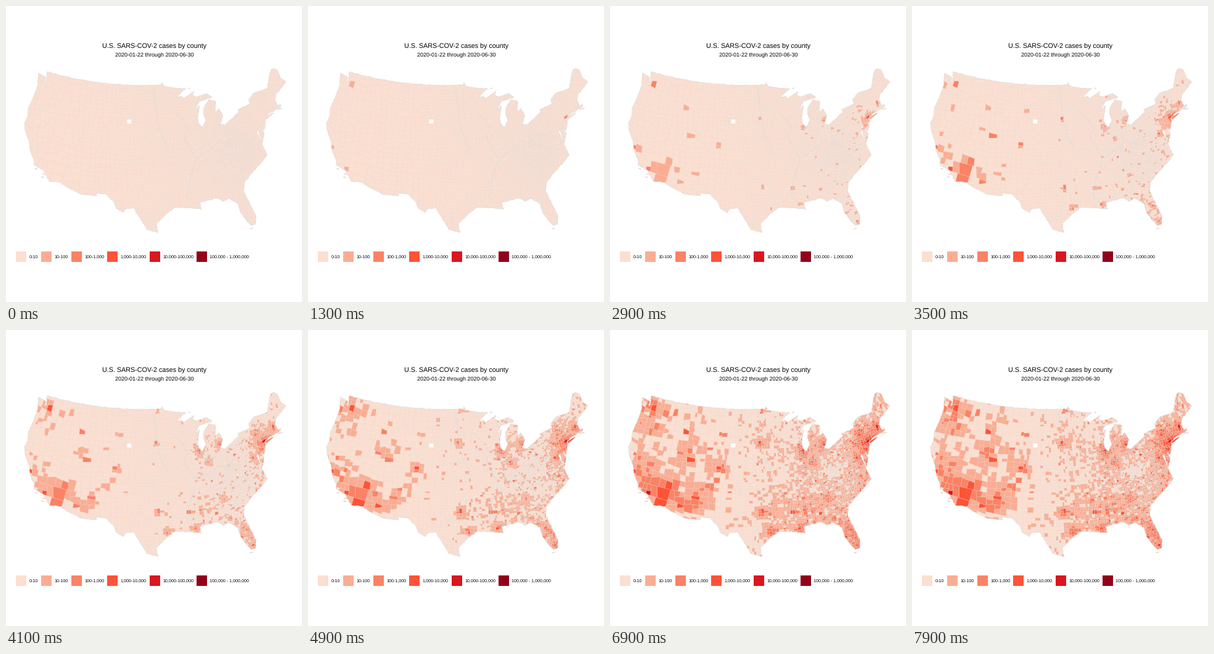
A matplotlib script for the animation above (8000 ms loop, 480 by 480 pixels).

```python
import numpy as np
import matplotlib.pyplot as plt
from matplotlib.animation import FuncAnimation
from matplotlib.collections import LineCollection, PolyCollection
from matplotlib.patches import PathPatch, Rectangle
from matplotlib.path import Path

plt.rcParams["text.hinting"] = "none"
PT = 0.72  # points per pixel at 100 dpi
STEPS = 38
SHADES = np.array(["#fbdfd1", "#faad93", "#fb8265", "#fe5338", "#da161e", "#92001a"])
LABELS = ["0-10", "10-100", "100-1,000", "1,000-10,000", "10,000-100,000",
          "100,000 - 1,000,000"]
SWATCH_X = [16, 57, 106, 164, 233, 309]
GREY = "#d8dcde"
rng = np.random.default_rng(11)

# Key points of the border as (longitude, latitude)
WEST_COAST = [
    (-124.7, 48.38), (-124, 46.6), (-124.1, 44.6), (-124.5, 42.8), (-124.1, 41.4),
    (-124.4, 40.4), (-123.8, 39.3), (-122.5, 37.8), (-121.9, 36.6), (-120.6, 35.1),
    (-120.5, 34.5), (-118.5, 34), (-118.3, 33.7), (-117.12, 32.53)]
SOUTH_BORDER = [
    (-114.72, 32.72), (-114.81, 32.5), (-111.07, 31.33), (-108.21, 31.33),
    (-108.21, 31.78), (-106.5, 31.78), (-105, 30.65), (-104.5, 29.65), (-103.2, 28.98),
    (-102.7, 29.7), (-101.4, 29.77), (-100.3, 28.3), (-99.1, 26.4), (-97.15, 25.88)]
GULF_COAST = [
    (-97.4, 27.3), (-95.1, 29.1), (-93.8, 29.7), (-91.3, 29.4), (-90.1, 29.15),
    (-89.4, 29), (-89.5, 30.1), (-87.2, 30.35), (-86.2, 30.4), (-85.3, 29.7),
    (-84.3, 30.05), (-82.8, 29), (-82.6, 27.5), (-81.7, 25.9), (-81.1, 25.15),
    (-80.4, 25.2)]
EAST_COAST = [
    (-80.05, 26.5), (-80.6, 28.2), (-81.4, 30.7), (-81, 31.9), (-79.4, 33.1),
    (-77.95, 33.9), (-76.5, 34.7), (-75.6, 35.25), (-76, 36.9), (-76.4, 39.2),
    (-76.1, 39.3), (-75.95, 37.2), (-75.05, 38.5), (-75.5, 39.55), (-74.9, 38.95),
    (-74, 40.4), (-74, 40.75), (-72.9, 41.25), (-70.7, 41.55), (-70, 41.65),
    (-70, 42.05), (-70.5, 41.8), (-70.8, 42.8), (-70.2, 43.6), (-67, 44.8)]
LAKES = [
    (-67.8, 45.7), (-67.8, 47.05), (-68.3, 47.35), (-69.2, 47.45), (-70, 46.7),
    (-71.5, 45), (-74.7, 45), (-76.2, 44.2), (-76.2, 43.55), (-79.05, 43.27),
    (-78.9, 42.85), (-82.5, 41.4), (-83.4, 41.7), (-82.45, 42.9), (-83, 44.07),
    (-83.9, 43.7), (-83.4, 45.3), (-84.75, 45.78), (-86.2, 44.7), (-86.5, 43.7),
    (-86.2, 42.7), (-87.2, 41.65), (-87.8, 42.3), (-87.9, 43.2), (-87.1, 45.1),
    (-88, 44.6), (-87, 45.75), (-84, 46), (-85, 46.75), (-87.4, 46.5), (-88.3, 46.9),
    (-87.8, 47.45), (-90.4, 46.55), (-90.9, 46.95), (-92.1, 46.75), (-90.3, 47.75),
    (-89.6, 48), (-92, 48.3), (-94.6, 48.75), (-95.15, 49.38)]
PARALLEL = [(lon, 49) for lon in np.linspace(-95.15, -122.76, 8)]
SOUND = [(-122.5, 48.2), (-122.35, 47.6), (-122.6, 47.3), (-122.7, 48.1)]
LONG_ISLAND = [(-73.98, 40.6), (-73.75, 40.87), (-72.3, 41.13), (-71.9, 41.06),
               (-73.6, 40.57)]
ISLETS = [(-120, 34), (-118.4, 33.4), (-118.45, 32.95), (-70.6, 41.38), (-70.1, 41.28),
          (-88.8, 48), (-81.2, 24.7)]
RIVERS = [
    [(-93.3, 45), (-91.2, 43.3), (-90.2, 41.8), (-91.2, 40.5), (-89.2, 37), (-91, 33.7),
     (-91.6, 31), (-90.2, 30)],
    [(-97.2, 49), (-96.5, 43.5), (-95.8, 41), (-94.6, 39.1)],
    [(-89.2, 37), (-85.7, 38.3), (-84.5, 39.1), (-82.5, 38.5), (-80.7, 40)]]

# Wide regions: longitude, latitude, log10 gain, radius in degrees
REGIONS = [
    (-120.5, 37, 1.6, 2.6), (-116.3, 34.5, 2.1, 2.2), (-111.3, 34.2, 1.6, 2.6),
    (-107.8, 35.5, 0.9, 1.8), (-121.5, 46.8, 1.2, 2.5), (-122.8, 43.5, 0.5, 1.8),
    (-112.5, 42, 0.6, 2.2), (-105.5, 39.8, 1.4, 1.4), (-74.5, 41, 1.4, 3.4),
    (-86, 42, 0.9, 2.3), (-81.3, 27.8, 1.3, 2.6), (-87, 32.5, 0.7, 4.5),
    (-78.5, 36.5, 0.7, 3), (-81.5, 37.9, -0.8, 2), (-92, 38, -0.4, 2),
    (-91, 46.5, -0.8, 3)]
# Metropolitan peaks: longitude, latitude, log10 final count; the first four lead
LEADERS = 4
METROS = [
    (-118.2, 34.2, 4.25), (-121.8, 47.5, 3.95), (-121.7, 37.2, 3.95), (-74, 40.85, 4.9),
    (-72.9, 40.9, 4.6), (-87.8, 41.8, 4.2), (-83.2, 42.3, 4.15), (-80.5, 25.7, 4.03),
    (-71.3, 42.4, 4.1), (-75.2, 40, 4.1), (-112.2, 33.4, 3.7), (-115.2, 36.1, 3.7),
    (-116.8, 33, 3.8), (-104.9, 39.7, 3.6), (-111.9, 40.7, 3.5), (-95.4, 29.8, 3.7),
    (-97, 32.8, 3.7), (-90.1, 29.9, 3.8), (-84.4, 33.8, 3.6), (-77, 38.9, 3.9),
    (-86.2, 39.8, 3.7), (-96.7, 43.6, 3.5)]


def project(lonlat):
    """Lambert azimuthal equal-area about 45N 100W, in stage pixels."""
    lon, lat = np.radians(np.asarray(lonlat, float)).T
    d = lon + np.radians(100)
    c = np.sqrt(0.5)
    toward = np.cos(lat) * np.cos(d)
    k = 595 * np.sqrt(2 / (1 + c * (np.sin(lat) + toward)))
    return np.column_stack([219.5 + k * np.cos(lat) * np.sin(d),
                            170 - k * c * (np.sin(lat) - toward)])


def box(w, s, e, n):
    return np.array([(w, s), (e, s), (e, n), (w, n)])


def islet(lon, lat):
    return np.array([(lon - 0.3, lat), (lon, lat + 0.06), (lon + 0.3, lat - 0.02),
                     (lon, lat - 0.07)])


def closed(points):
    return Path(np.vstack([points, points[:1]]), closed=True)


def roughen(points, amount, step=0.25):
    """Resample a line and give it a small seeded wiggle."""
    points = np.asarray(points, float)
    out = []
    for p, q in zip(points[:-1], points[1:]):
        n = max(1, int(np.hypot(*(q - p)) / step))
        leg = p + (q - p) * np.arange(n)[:, None] / n
        leg[1:] += rng.normal(0, amount, (n - 1, 2))
        out.extend(leg)
    return np.array(out + [points[-1]])


def bump(at, lon, lat, radius):
    d2 = ((at[..., 0] - lon) * 0.78) ** 2 + (at[..., 1] - lat) ** 2
    return np.exp(-d2 / radius ** 2)


def keep_side(poly, d):
    out = []
    for i, p in enumerate(poly):
        j = (i + 1) % len(poly)
        if d[i] >= 0:
            out.append(p)
        if d[i] * d[j] < 0:
            out.append(p + (poly[j] - p) * d[i] / (d[i] - d[j]))
    return np.array(out)


def split(poly):
    """Halve a region until it is county-sized for its longitude."""
    lo, hi = poly.min(0), poly.max(0)
    span = (hi - lo) * (0.78, 1)
    mid = (lo + hi) / 2
    limit = np.interp(mid[0], [-124, -117, -110, -100, -84, -78, -70],
                      [1.0, 1.5, 1.4, 0.7, 0.54, 0.54, 0.7])
    limit += 0.5 * bump(mid, -114, 35, 3)
    if span.max() < limit * rng.uniform(0.75, 1.25):
        return [poly]
    axis = int(span.argmax())
    tilt = np.interp(mid[0], [-112, -104, -92, -82], [0.25, 0.06, 0.1, 0.45])
    normal = np.ones(2)
    normal[1 - axis] = rng.uniform(-tilt, tilt)
    d = (poly - lo - (hi - lo) * rng.uniform(0.38, 0.62)) @ normal
    return split(keep_side(poly, d)) + split(keep_side(poly, -d))


def model(at):
    """Final log10 case count and delay factor for each county centre."""
    lon = at[:, 0]
    level = 0.65 - 0.5 * np.exp(-((lon + 102) / 4) ** 2)
    level += 0.35 / (1 + np.exp(-(lon + 97) / 1.2))
    level += sum(gain * bump(at, x, y, r) for x, y, gain, r in REGIONS)
    level += rng.normal(0, 0.48, len(at)) + 1.1 * (rng.random(len(at)) < 0.06)
    delay = np.ones(len(at))
    for i, (x, y, peak) in enumerate(METROS):
        away = np.hypot((lon - x) * 0.78, at[:, 1] - y)
        level = np.maximum(level, peak - 0.5 - 1.7 * away)
        METRO_CELLS.append(away.argmin())
        if i < LEADERS:
            delay[away.argmin()] = 0.8
    level = np.minimum(level, 3.6)
    level[METRO_CELLS] = [peak for *_, peak in METROS]
    return level, delay


METRO_CELLS = []
shore = (WEST_COAST + SOUTH_BORDER + GULF_COAST + EAST_COAST + LAKES + PARALLEL + SOUND)
mainland = closed(project(roughen(shore, 0.035)))
islands = [np.array(LONG_ISLAND)] + [islet(*place) for place in ISLETS]
land = Path.make_compound_path(mainland, *[closed(project(i)) for i in islands])

cells = [c for c in split(box(-126, 24, -66, 50))
         if mainland.contains_points(project(np.vstack([c, c.mean(0)]))).any()]
cells += islands
centres = np.array([c.mean(0) for c in cells])
levels, delays = model(centres)


def classes(step):
    lag = 5 * (1 - step / STEPS) ** 2.3
    return np.clip(np.floor(levels - lag * delays), 0, 5).astype(int)


fig = plt.figure(figsize=(4.8, 4.8), dpi=100, facecolor="white")
ax = fig.add_axes([0, 0, 1, 1])
ax.set(xlim=(0, 480), ylim=(480, 0))
ax.axis("off")


def label(x, y, text, px, ha="left"):
    ax.text(x, y, text, fontsize=px * PT, family="Liberation Sans", ha=ha,
            va="baseline", color="black")


label(241, 69, "U.S. SARS-COV-2 cases by county", 10.8, "center")
label(241, 82.3, "2020-01-22 through 2020-06-30", 9.03, "center")
for x, shade, text in zip(SWATCH_X, SHADES, LABELS):
    ax.add_patch(Rectangle((x, 398), 17, 17, fc=shade, ec="none"))
    label(x + 21.5, 409.2, text, 7.15)

ax.add_patch(PathPatch(land, fc=SHADES[0], ec="none"))
widths = 0.2 + 0.25 * bump(centres, -82, 37, 4)
counties = PolyCollection([project(c) for c in cells], edgecolors="#e6dcd7",
                          linewidths=widths)
ax.add_collection(counties)
counties.set_clip_path(land, ax.transData)
ax.add_collection(LineCollection([project(roughen(r, 0.06)) for r in RIVERS],
                                 colors=GREY, linewidths=0.5))
ax.add_patch(PathPatch(land, fc="none", ec=GREY, lw=0.35))
ax.add_patch(PathPatch(closed(project(box(-103.05, 43, -102.15, 43.62))),
                       fc="white", ec="none"))


def draw(frame):
    step = 0 if frame < 5 else (frame - 5) // 2 + 1
    counties.set_facecolor(SHADES[classes(step)])
    return [counties]


anim = FuncAnimation(fig, draw, frames=80, interval=100, repeat=True,
                     repeat_delay=0, blit=False)
plt.show()
```
